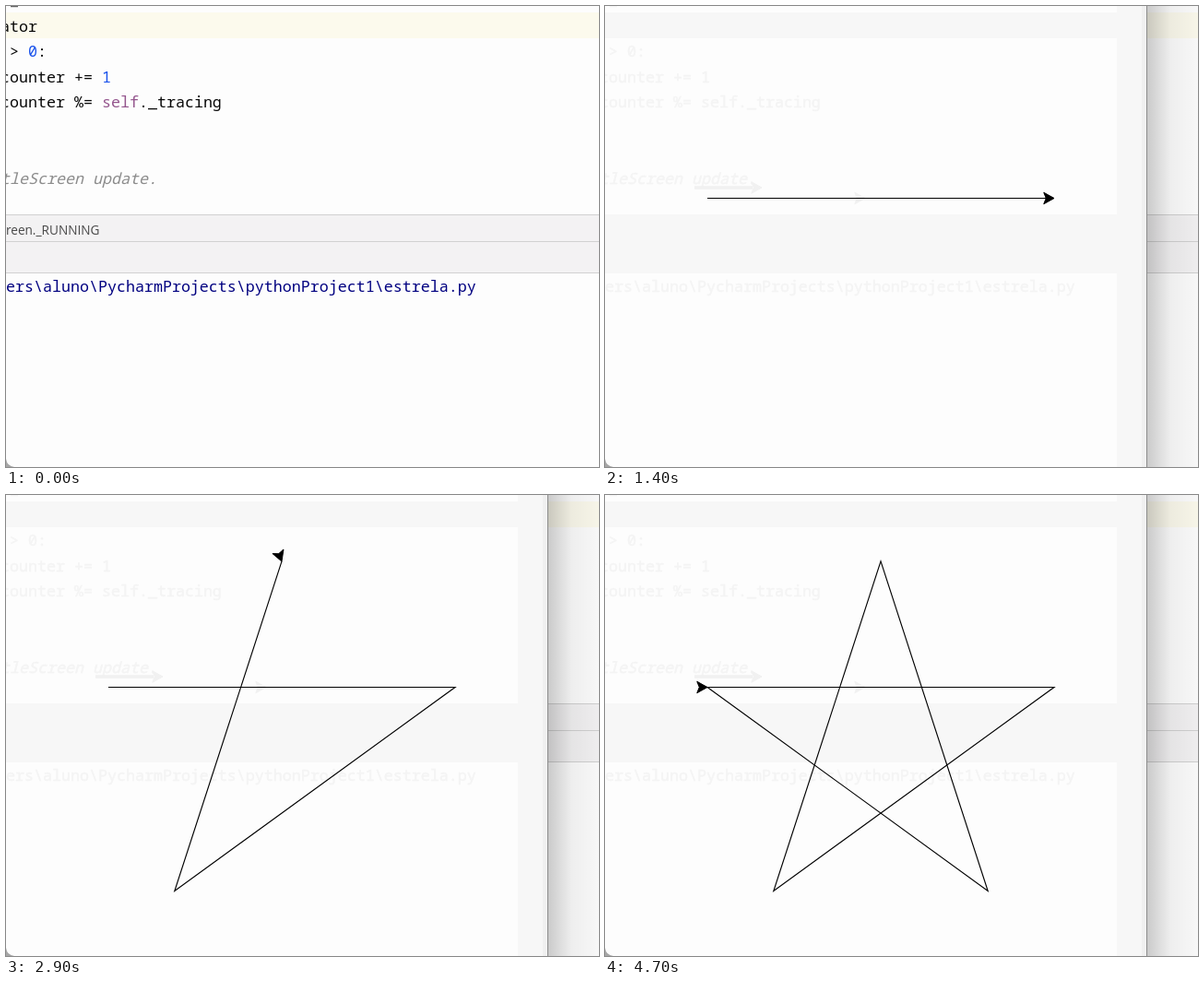
An HTML page that plays this animation: 643x500 px, repeating every 4.8 s.

```html
<!DOCTYPE html>
<html lang="en">
<head>
<meta charset="utf-8">
<title>Star drawing</title>
<style>
  html, body { margin: 0; width: 100%; height: 100%; overflow: hidden; background: #fdfdfd; }
  svg { display: block; width: 643px; height: 500px; }
  .code { font: 16.67px "Noto Sans Mono", "DejaVu Sans Mono", monospace; fill: #080808; white-space: pre; }
  .num { fill: #1750eb; }
  .self { fill: #94558d; }
  .note { fill: #8c8c8c; font-style: italic; }
  .path { fill: #000080; }
  .tab { font: 13.6px "Open Sans", "Noto Sans", sans-serif; fill: #484848; }
  .ghost .code, .ghost .code tspan { fill: #f4f4f4; stroke: #f4f4f4; stroke-width: .6; }
</style>
</head>
<body>
<svg viewBox="0 0 643 500">
  <defs>
    <linearGradient id="shade">
      <stop offset="0" stop-opacity=".2"/>
      <stop offset=".45" stop-opacity=".06"/>
      <stop offset="1" stop-opacity=".02"/>
    </linearGradient>
    <g id="text">
      <rect x="5" y="0" width="8" height="1.2" opacity=".6"/>
      <text class="code" x="4" y="55">&gt; <tspan class="num">0</tspan>:</text>
      <text class="code" x="-6" y="83">counter += <tspan class="num">1</tspan></text>
      <text class="code" x="-6" y="110">counter %= <tspan class="self">self</tspan>._tracing</text>
      <text class="code note" x="-6" y="193">tleScreen update.</text>
      <text class="code path" x="0" y="310">ers\aluno\PycharmProjects\pythonProject1\estrela.py</text>
    </g>
    <path id="head" d="M0 0L-11.25 -6.25L-8.75 0L-11.25 6.25Z" stroke-width="1" stroke-linejoin="round"/>
  </defs>

  <rect width="643" height="500" fill="#fdfdfd"/>
  <rect y="7" width="643" height="28" fill="#fcfaed"/>
  <rect y="226" width="643" height="64" fill="#f3f2f3"/>
  <path d="M0 226.5H643M0 255.5H643M0 289.5H643" stroke="#d1d1d1"/>
  <g id="editor">
    <text class="code" x="-6" y="28">ator</text>
    <text class="tab" x="0" y="248">reen._RUNNING</text>
    <use href="#text"/>
  </g>

  <g id="window">
    <rect id="shadow" width="56" height="500" fill="url(#shade)"/>
    <rect id="rest" x="643" width="100" height="500" opacity=".02"/>
    <rect id="pane" height="500" fill="#f7f7f7"/>
    <path d="M0 0H555V7H0ZM0 35H555V226H0ZM0 290H555V500H0Z" fill="#fdfdfd"/>
    <rect id="frame" width="5" height="500" fill="#f0f0f0"/>
    <rect id="edge" width="1" height="500" fill="#8c8c8c"/>
    <g class="ghost" id="ghostText"></g>
    <g id="trail" fill="#f1f1f1" stroke="#f1f1f1">
      <path d="M97 197H160" stroke-width="3.5"/>
      <use href="#head" x="170" y="197"/>
      <use href="#head" x="282" y="208.5"/>
    </g>
    <g id="drawing" stroke="#000">
      <polyline id="line" fill="none" stroke-width="1.15"/>
      <use id="turtle" href="#head"/>
    </g>
  </g>
  <path d="M0 491Q1 499 9 500H0Z" fill="#a6a6a6"/>
</svg>
<script>
const LOOP = 4800, STEP = 100, OPEN = 1100;
const SIDE = 376, TURN = 144;
// Times at which forward moves and turns alternately begin.
const beats = [1025, 1400, 1650, 2025, 2257, 2625, 2905, 3300, 3600, 4050, 4300];

const el = id => document.getElementById(id);
const set = (id, attrs) => {
  for (const name in attrs) el(id).setAttribute(name, attrs[name]);
};

// The faded copy left behind by the editor shares its lines of code.
for (const node of el("text").children) el("ghostText").append(node.cloneNode(true));
el("ghostText").firstElementChild.setAttribute("fill", "#f1f1f1");

const corners = [[111, 208.5]];
for (let i = 0; i < 5; i++) {
  const a = i * TURN * Math.PI / 180, [x, y] = corners[i];
  corners.push([x + SIDE * Math.cos(a), y + SIDE * Math.sin(a)]);
}

function phaseAt(t) {
  const last = beats.length - 1;
  if (t >= beats[last]) return last;
  const i = beats.findIndex(b => b > t) - 1;
  return i + (t - beats[i]) / (beats[i + 1] - beats[i]);
}

function render(time) {
  const t = Math.floor((time % LOOP) / STEP) * STEP;
  const open = t >= OPEN;
  set("editor", { visibility: open ? "hidden" : "visible" });
  set("window", { display: open ? "inline" : "none" });
  if (!open) return;

  const growing = t === OPEN, right = growing ? 561 : 587;
  set("pane", { width: growing ? 556 : right });
  set("frame", { x: right - 5 });
  set("edge", { x: right });
  set("shadow", { x: right + 1 });
  set("trail", { display: growing ? "none" : "inline" });
  set("drawing", { transform: growing ? "translate(-11.2 -6) scale(.975)" : "" });

  const phase = phaseAt(t), side = Math.floor(phase / 2), part = phase - side * 2;
  const moved = Math.min(part, 1), turned = Math.max(part - 1, 0);
  const from = corners[side], to = corners[side + 1] || from;
  const [x, y] = from.map((v, i) => v + (to[i] - v) * moved);
  set("line", { points: [...corners.slice(0, side + 1), [x, y]].join(" ") });
  set("turtle", { transform: `translate(${x} ${y}) rotate(${(side + turned) * TURN})` });
}

const start = performance.now();
function tick() {
  render(performance.now() - start);
  requestAnimationFrame(tick);
}
tick();
</script>
</body>
</html>
```
